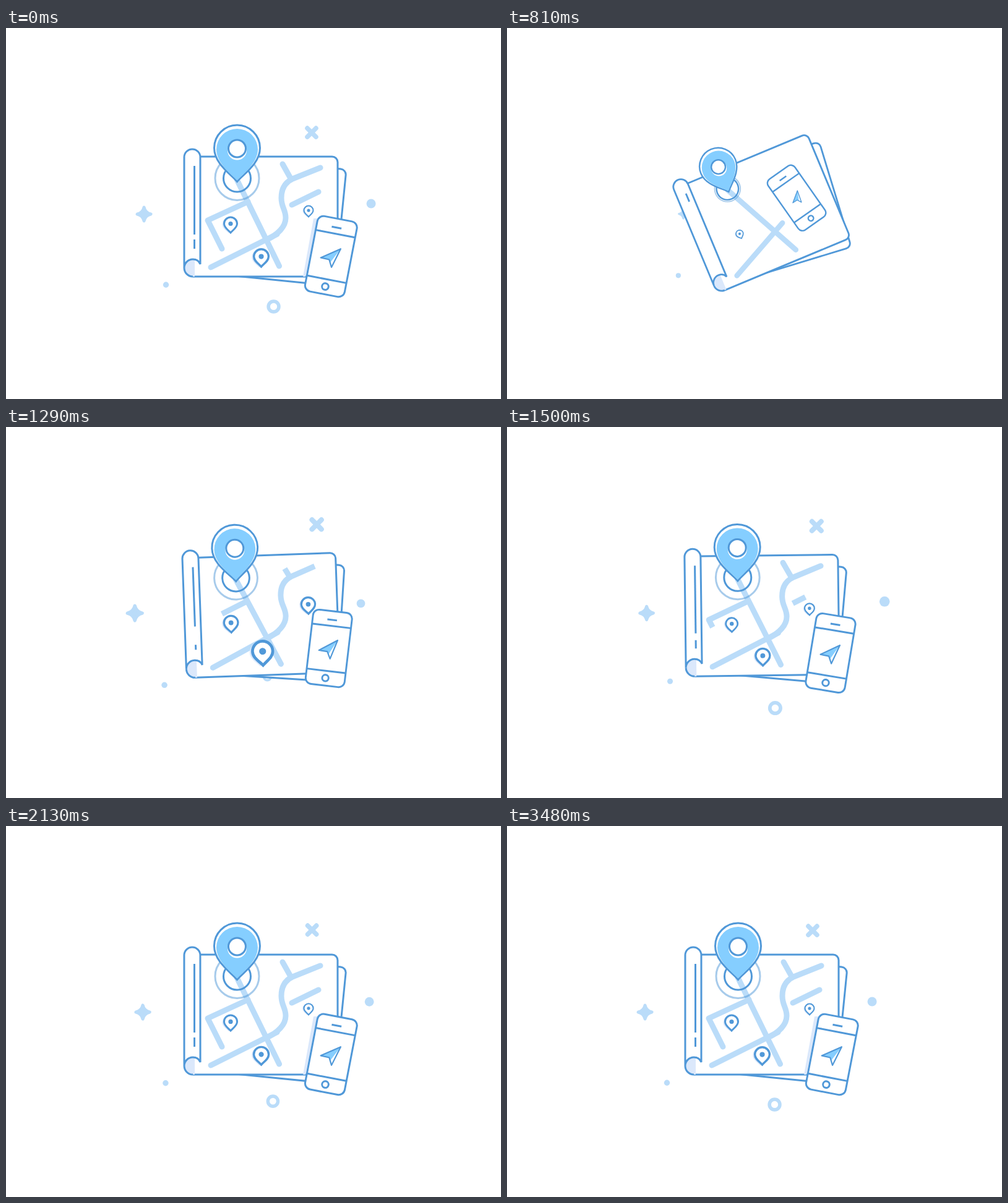
Animation, 800 px wide and 600 px high, one loop 3510 ms. Source, as an HTML page:

```html
<!DOCTYPE html>
<html lang="en">
<head>
<meta charset="utf-8">
<title>Map</title>
<style>
  html, body { margin: 0; width: 100%; height: 100%; overflow: hidden; background: #fff; }
  svg { display: block; width: 800px; height: 600px; }
  .line { fill: none; stroke: #5098d8; stroke-width: 3; }
  .white { fill: #fff; }
  .dark { fill: #5098d8; }
  .blue { fill: #85ceff; }
  .shade { fill: #dbe8fb; }
  .pale { fill: #badcf9; }
  .road { fill: none; stroke: #badcf9; stroke-width: 9; stroke-linejoin: round; }
</style>
</head>
<body>
<svg viewBox="0 0 800 600">
  <defs>
    <path id="drop" d="M0 0C-4-4.5-10.5-8-10.5-14.5a10.5 10.5 0 0 1 21 0C10.5-8 4-4.5 0 0z"/>
    <g id="pin">
      <use href="#drop" class="shade" x="-3" y="1"/>
      <use href="#drop" class="line white"/>
      <circle class="dark" cy="-14.5" r="3.6"/>
    </g>
  </defs>

  <!-- ornaments -->
  <path id="star" class="pale" d="M223 290q2 9 11 11q-9 2-11 11q-2-9-11-11q9-2 11-11z" stroke="#badcf9" stroke-width="5" stroke-linejoin="round"/>
  <path id="cross" class="road" d="M487 162l14 14m0-14l-14 14" stroke-linecap="round" style="stroke-width:7.5"/>
  <circle id="dot" class="pale" cx="590" cy="284" r="7.5"/>
  <circle id="speck" class="pale" cx="258.5" cy="415.3" r="4.7"/>
  <circle id="hoop" class="road" cx="432.5" cy="450.3" r="8.4" style="stroke-width:5.6"/>

  <g id="map">
    <rect class="line white" x="-200" width="200" height="189" rx="9" transform="translate(550 229) rotate(5.7)"/>
    <path class="line white" d="M314 208H527a9 9 0 0 1 9 9V393a9 9 0 0 1-9 9H302"/>
    <path class="shade" d="M288 388C288 379 294 374 302 374H305V402H302A14 14 0 0 1 288 388z"/>
    <path class="line white" d="M288 388V209a13 13 0 0 1 26 0V382C312 377 308 374 302 374A14 14 0 0 0 288 388"/>
    <path class="line" d="M288 388a14 14 0 0 0 14 14"/>
    <path id="fold1" class="line" pathLength="1" d="M304.5 223V334"/>
    <path id="fold2" class="line" pathLength="1" d="M304.5 357V342"/>

    <path id="main" class="road" pathLength="1" d="M441.5 385L373 245"/>
    <path id="west" class="road" pathLength="1" d="M438 333.5L331 387"/>
    <path id="bend" class="road" pathLength="1" d="M420 343C440 334 452 321 452 307C452 294 445 290 445 275C445 259 452 249 463 244L508 226"/>
    <path id="spur" class="road" pathLength="1" d="M461 245L447 220"/>
    <path id="block" class="road" pathLength="1" d="M391 281L326 311L349 357"/>
    <path id="lane" class="road" pathLength="1" d="M462 286L505 265"/>

    <circle id="wave" class="line" cx="373.5" cy="243" r="35.5" opacity=".5"/>
    <circle id="ring" class="line" cx="373.5" cy="243" r="22"/>

    <use id="pinA" href="#pin"/>
    <use id="pinB" href="#pin"/>
    <use id="pinC" href="#pin"/>

    <g id="marker">
      <g transform="translate(373.5 248.5)">
        <path class="line white" d="M0 0C-10-12-37-29-37-54.5a37 37 0 0 1 74 0C37-29 10-12 0 0z"/>
        <path class="blue" d="M0-2C-10-13-33.5-30-33.5-52a33.5 33.5 0 0 1 67 0C33.5-30 10-13 0-2z"/>
        <circle class="white" cy="-50.5" r="15.5"/>
        <circle class="line white" cy="-53.5" r="14"/>
      </g>
    </g>

    <path id="shadow" class="shade" d="M503 308L484 402H480L497 308z"/>
    <g id="phone">
      <g transform="translate(525.3 369.5) rotate(10.9)">
        <rect class="line white" x="-32.5" y="-62" width="65" height="124" rx="10"/>
        <path class="line" d="M-32-37.5H32M-32 37.5H32M-8-47.6H8"/>
        <circle class="line" cy="49.5" r="5.3"/>
        <g id="arrow">
          <path class="blue" d="M13-15L-16 5L-2 5.5L4 17z"/>
          <path class="white" d="M13-15L1 9L4 17z"/>
          <path class="line" d="M13-15L-16 5L-2 5.5L4 17z" style="stroke-width:2.2" stroke-linejoin="round"/>
        </g>
      </g>
    </g>
  </g>
</svg>
<script>
const LOOP = 3510, STEP = 30;
const $ = id => document.getElementById(id);

// Remaining share (1 to 0) of a move that starts softly and decays.
const decay = (t, start, k, soft) => {
  const u = Math.max(0, t - start);
  return Math.exp(-k * u * u / (u + soft));
};
const pop = (t, start, k) => 1 - decay(t, start, k, 106);

// Rise from 0 to 1 with a long tail; half way after "half" ms.
const glide = (t, start, half) =>
  t > start ? 1 / (1 + (half / (t - start)) ** 2.3) : 0;

// Linear rise reaching 1 at time "hit", then a damped swing around 1.
const spring = (t, hit, rise, amp, damp) => {
  const u = t - hit;
  return u < 0 ? Math.max(0, 1 + u / rise)
    : 1 + amp * Math.sin(Math.PI * u / 440) * Math.exp(-damp * u);
};

const pivot = (id, x, y, scale, turn = 0) =>
  $(id).setAttribute('transform',
    `translate(${x} ${y}) rotate(${turn}) scale(${scale}) translate(${-x} ${-y})`);

const grow = (id, t, from, to) => {
  const u = Math.min(1, Math.max(0, (t - from) / (to - from)));
  const path = $(id), road = path.classList.contains('road');
  path.style.display = u ? '' : 'none';
  path.setAttribute('stroke-dasharray', u < 1 ? `${u * (2 - u)} 2` : 'none');
  path.setAttribute('stroke-linecap', road && u === 1 ? 'round' : 'butt');
};

const ornaments = { speck: 888, star: 1020, cross: 1195, dot: 1342, hoop: 1476 };
const trims = {
  main: [330, 600], west: [520, 780], bend: [850, 1400], spur: [1180, 1500],
  block: [1100, 2000], lane: [1400, 1760], fold1: [750, 1600], fold2: [1100, 1700]
};
const pins = { pinA: [363, 331, 1, 900], pinB: [412.5, 386, 1.13, 1035], pinC: [489, 305.3, .71, 1100] };

function draw(t) {
  const turn = -390 * decay(t, 180, .00502, 70);
  pivot('map', 400, 300, 1 - decay(t, 180, .0086, 576), turn);
  pivot('phone', 321, 385, glide(t, 440, 168), turn * 1.03);
  pivot('ring', 373.5, 243, pop(t, 450, .007));
  pivot('wave', 373.5, 243, pop(t, 600, .007));
  pivot('marker', 373.5, 248.5, pop(t, 570, .012));
  pivot('arrow', 0, 0, pop(t, 605, .01));
  $('shadow').setAttribute('opacity', Math.min(1, Math.max(0, (t - 1800) / 300)));

  for (const id in ornaments) pivot(id, 400, 300, spring(t, ornaments[id], 600, .175, .0025));
  for (const id in trims) grow(id, t, ...trims[id]);
  for (const id in pins) {
    const [x, y, size, hit] = pins[id];
    $(id).setAttribute('transform',
      `translate(${x} ${y}) scale(${size * spring(t, hit, 225, 1.09, .004)})`);
  }
  // the long tail of the phone is cut once everything rests
  if (t >= 1770) pivot('phone', 321, 385, 1);
}

const begin = performance.now();
function frame(now) {
  const t = Math.floor(Math.max(0, now - begin) % LOOP / STEP) * STEP;
  draw(t || LOOP - STEP); // the loop opens on the finished picture
  requestAnimationFrame(frame);
}
frame(begin);
</script>
</body>
</html>
```
